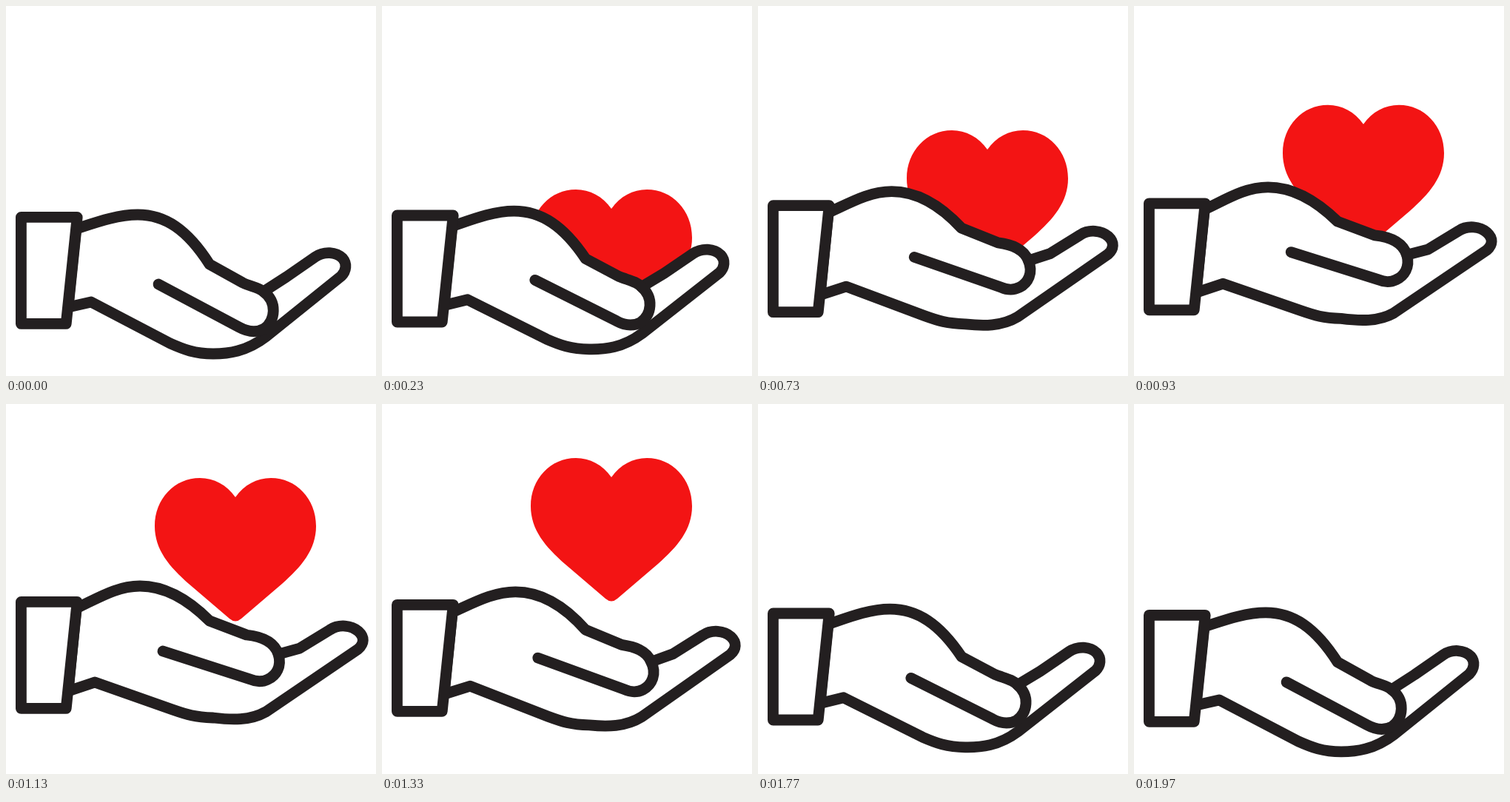
Recreate the animation shown at these times as an HTML page. Size 500 px wide and 500 px high, loop 2010 ms.

```html
<!DOCTYPE html>
<html lang="en">
<head>
<meta charset="utf-8">
<title>Giving hand</title>
<style>
  html, body { margin: 0; width: 100%; height: 100%; overflow: hidden; background: #fff; }
  svg { display: block; width: 100%; height: 100%; }
  .line { stroke: #231f20; stroke-width: 14.8; stroke-linecap: round; stroke-linejoin: round; }
</style>
</head>
<body>
<svg viewBox="0 0 500 500">
  <path id="heart" fill="#f31414" d="M310 26C298 9 281 0 262 0C228 0 201 28 201 65C201 97 221 120 247 143L302 190Q310 197 318 190L373 143C399 120 419 97 419 65C419 28 392 0 358 0C339 0 322 9 310 26Z"/>
  <path id="palm" class="line" fill="#fff"/>
  <path id="thumb" class="line" fill="none"/>
  <path id="cuff" class="line" fill="#fff" d="M20.4 0H96.2L81.2 144H20.4Z"/>
</svg>
<script>
const LOOP = 2010, FRAMES = 60;
const part = id => document.getElementById(id);

// Each shape has a low and a raised pose with matching points.
const palm = [
  'M95 301C120 293 150 282 178 282C215 282 245 302 275 349L320 374C330 379 341 380 348 386' +
  'L379 366L418 339C430 331 446 332 455 341C461 348 460 358 453 365L351 447' +
  'C325 467 300 470 280 470C255 470 240 464 222 456L115 400L84 407Z',
  'M95 276C125 262 150 246 181 246C216 246 247 265 275 293L325 312C344 314 362 320 368 338' +
  'L397 330L438 305C450 297 467 299 476 307C485 315 484 324 476 331L351 416' +
  'C330 428 305 427 280 424C255 423 245 420 225 413L120 376L84 388Z'
];
const thumb = [
  'M348 386C367 400 364 425 349 436C338 442 326 440 315 434L206 376',
  'M368 338C373 355 365 367 354 372C346 376 337 375 330 372L212 334'
];

// Top of the heart by step; it is shown only within this span.
const rise = [[7, 248], [14, 213], [22, 168], [32, 111], [34, 100], [40, 73], [43, 62.5], [46, 54]];

const mix = (a, b, k) => a + (b - a) * k;

function morph([low, high], k) {
  const ends = high.match(/\d+/g);
  let n = 0;
  return low.replace(/\d+/g, v => mix(+v, +ends[n++], k).toFixed(2));
}

function heartTop(step) {
  const n = rise.findIndex(([s]) => s >= step);
  if (n < 0 || step < rise[0][0]) return null;
  if (n === 0) return rise[0][1];
  const [s0, y0] = rise[n - 1], [s1, y1] = rise[n];
  return mix(y0, y1, (step - s0) / (s1 - s0));
}

// Thirty steps a second, on a 10 ms grid.
function stepAt(ms) {
  const n = Math.round(ms * 0.03);
  return Math.min(FRAMES - 1, Math.round(n * 10 / 3) * 10 > ms ? n - 1 : n);
}

function draw(step) {
  const k = Math.sin(Math.PI * step / FRAMES) ** 2 / 0.957;
  part('palm').setAttribute('d', morph(palm, k));
  part('thumb').setAttribute('d', morph(thumb, k));
  part('cuff').setAttribute('transform', `translate(0 ${mix(285.4, 267.4, k)})`);
  const top = heartTop(step);
  part('heart').setAttribute('visibility', top === null ? 'hidden' : 'visible');
  if (top !== null) part('heart').setAttribute('transform', `translate(0 ${top})`);
}

const start = performance.now();
function tick() {
  draw(stepAt((performance.now() - start) % LOOP));
  requestAnimationFrame(tick);
}
tick();
</script>
</body>
</html>
```
